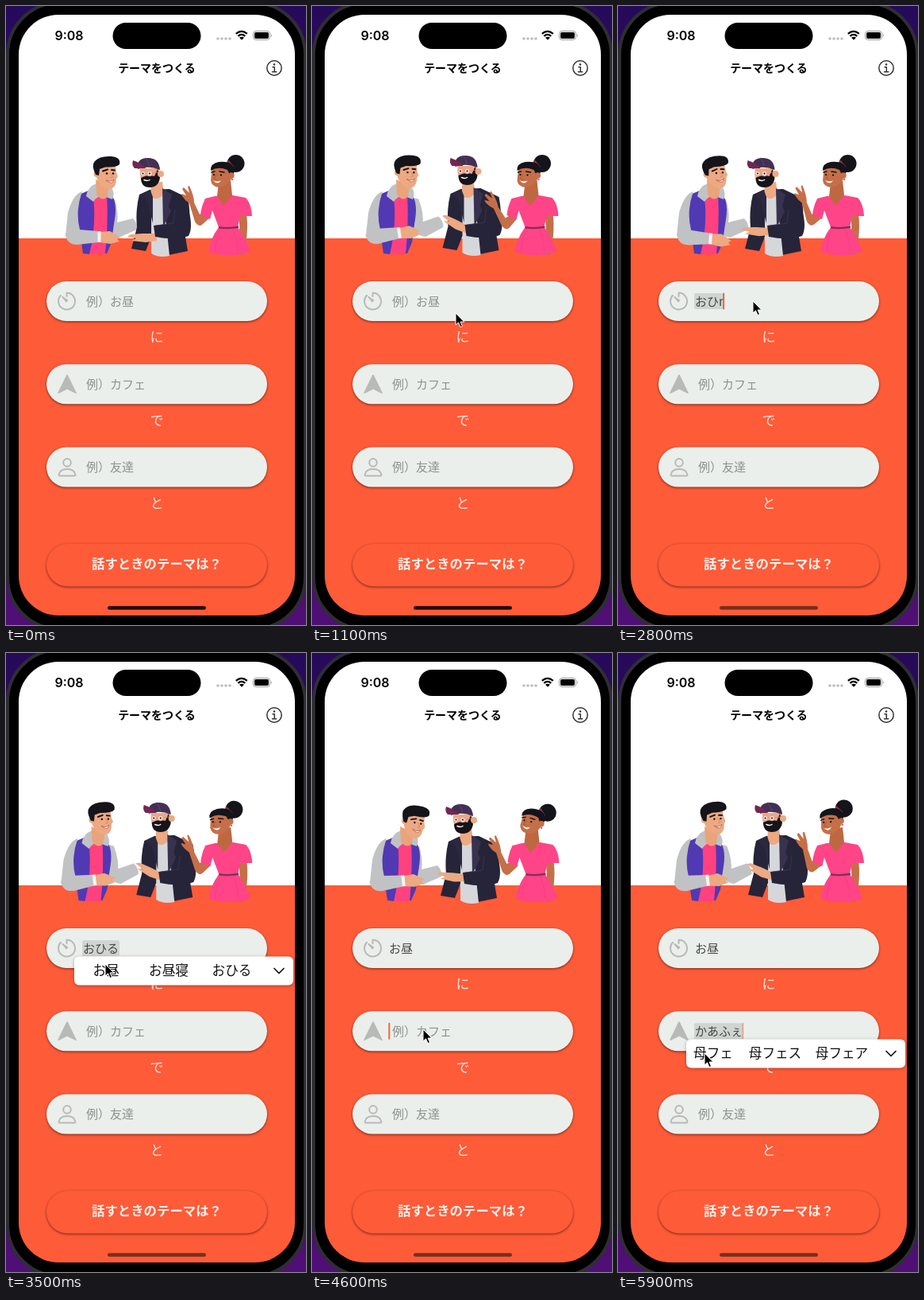
Write an HTML page that moves like this. It is 378 px wide and 778 px high and loops after 6000 ms.

```html
<!DOCTYPE html>
<html lang="ja">
<head>
<meta charset="utf-8">
<title>テーマをつくる</title>
<style>
html, body { margin: 0; width: 100%; height: 100%; overflow: hidden; background: #2b0b5c; }
svg { display: block; width: 378px; height: 778px; }
text { font-family: "Noto Sans CJK JP", "Noto Sans CJK", sans-serif; white-space: pre; }
.mid { text-anchor: middle; }
.link { font-size: 17px; font-weight: 300; fill: #ffe4dc; }
.hint { font-size: 15px; fill: #8d918f; }
.value { font-size: 15px; fill: #444746; }
.pick { font-size: 16.6px; fill: #111; }
.raised { filter: drop-shadow(0 1.3px 1.4px rgba(60, 15, 0, .7)); }
.icon { fill: none; stroke: #b7bab8; stroke-width: 2; stroke-linecap: round; stroke-linejoin: round; }
.line { fill: none; stroke-linecap: round; stroke-linejoin: round; }
</style>
</head>
<body>
<svg viewBox="0 0 378 778">
  <defs>
    <linearGradient id="desk" x2="0" y2="1">
      <stop stop-color="#260a5a"/><stop offset="1" stop-color="#500f76"/>
    </linearGradient>
    <clipPath id="screen"><rect x="16" y="11" width="348" height="755" rx="50"/></clipPath>
  </defs>
  <rect width="378" height="778" fill="url(#desk)"/>
  <rect x="2" y="-4" width="375" height="787" rx="65" fill="#000" stroke="#2f2e33" stroke-width="4"/>

  <g clip-path="url(#screen)">
    <rect width="378" height="293" fill="#fff"/>
    <rect y="292" width="378" height="486" fill="#fe5b39"/>
  </g>

  <rect x="134.500" y="21" width="111" height="33" rx="16.500"/>
  <text x="79.500" y="43" class="mid" style="font:600 16px Inter, sans-serif">9:08</text>
  <g fill="#bdbdbf">
    <circle cx="267" cy="41" r="1.800"/><circle cx="272" cy="41" r="1.800"/>
    <circle cx="277" cy="41" r="1.800"/><circle cx="282" cy="41" r="1.800"/>
  </g>
  <path d="M289.800 34.800q7-6 14 0M292.300 37.800q4.500-3.700 9 0" fill="none" stroke="#000" stroke-width="2.200"/>
  <path d="M294 39.800q3-2.200 6 0l-3 3z"/>
  <rect x="311.500" y="31.500" width="21" height="11" rx="3.500" fill="none" stroke="#999"/>
  <rect x="313" y="33" width="18" height="8" rx="2"/>
  <path d="M334 35.200q2.200 1.800 0 3.600z" fill="#999"/>
  <text x="190" y="83.300" class="mid" font-size="14" font-weight="700">テーマをつくる</text>
  <g stroke="#333" stroke-width="1.500">
    <circle cx="338" cy="78" r="9.200" class="line"/>
    <path d="M336 76.700h2.300v6M335.500 82.800h5.200" class="line"/>
  </g>
  <circle cx="338" cy="73.500" r="1.300" fill="#333"/>

  <g id="man">
    <g id="manReach">
      <path d="M128 240L137 243Q142 260 140 272L160 267Q166 273 165 281L142 291Q128 289 127 272Z" fill="#c1c2c4"/>
    </g>
    <path d="M104 232L92 237Q83 250 87 268Q93 285 95 297L97 311L105 312L127 311L133 297Q135 280 137 268Q140 249 134 239Z" fill="#5139b4"/>
    <path d="M110 240L127 238Q129 272 125 312L105 312Q114 276 110 240Z" fill="#ff427f"/>
    <path d="M96 233Q84 237 78 260L75 288Q78 299 89 299L93 281Q87 258 96 233Z" fill="#c1c2c4"/>
    <g id="manFore">
      <path d="M118 284l13-1 7 4 6 4-4 2 3 3-12 3-13-2z" fill="#eca982"/>
      <path d="M75 286Q76 300 90 300L116 297V283L92 281Z" fill="#c1c2c4"/>
      <path d="M115.500 283h4v14h-4z" fill="#f4f4f5"/>
    </g>
    <path d="M101 239Q103 227 114 223L132 227Q138 235 134 243L126 240Q117 236 110 246Z" fill="#c1c2c4"/>
    <path d="M113 218L130 226L128 239Q122 247 114 237Z" fill="#e9a47c"/>
    <g id="manHead">
      <path d="M115 201L138 201L139 209L141 214L139 217Q139 228 132 230Q119 230 114 215Z" fill="#eca982"/>
      <circle cx="114.500" cy="211" r="4" fill="#eca982"/>
      <path d="M113 212Q107 200 112 195Q118 188 133 189Q145 190 143 199Q140 203 125 202.500L118 205L117 213Z" fill="#15141b"/>
      <path d="M122 207.500l6-2M133 206l4 .5" class="line" stroke="#15141b" stroke-width="1.900"/>
      <circle cx="127" cy="210.500" r="1.200"/><circle cx="135" cy="210.500" r="1.200"/>
      <path d="M131.500 210l3 5-3 1" class="line" stroke="#cf845f" stroke-width=".8"/>
      <path d="M126 219q6 3 10-1q-2 8-10 1z" fill="#fff" stroke="#a84a3b" stroke-width=".7"/>
    </g>
  </g>

  <g id="pal">
    <path d="M181 231L168 237Q163 256 165 278L158 305L176 308L183 290L200 314L229 308L226 290Q235 270 229 241L206 230Z" fill="#262438"/>
    <path d="M183 240L198 237L206 314Q192 317 183 311Z" fill="#d6d7da"/>
    <path d="M183 222L197 221L199 236Q190 247 182 238Z" fill="#eca982"/>
    <path d="M182 232L170 237L178 245L185 273V240Z" fill="#2b2840"/>
    <path d="M197 229L209 237L205 252L208 258L198 278Z" fill="#38324f"/>
    <g id="palHand">
      <path d="M190 286L172 286L157 287L153 290L164 292L158 295L176 297L190 295Z" fill="#eca982"/>
    </g>
    <path d="M230 256Q236 278 230 289Q212 295 188 290L186 276L212 273Q217 258 219 250Z" fill="#262438"/>
    <path d="M213 256L211 273L189 276" class="line" stroke="#3d385a" stroke-width=".8"/>
    <g id="palHead">
      <path d="M169 204H193L192 219Q187 227 178 226Q170 223 169 212Z" fill="#eca982"/>
      <path d="M170 216Q179 211 187 214L191 205L194 216Q192 228 181 228Q170 228 170 216Z" fill="#15141b"/>
      <circle cx="195" cy="211" r="4" fill="#eca982"/>
      <path d="M166 205Q164 192 177 191Q193 190 194 206Q180 200 166 205Z" fill="#423055"/>
      <path d="M176 191Q180 196 181 202" class="line" stroke="#71405f" stroke-width="1"/>
      <path d="M160 194Q158 200 162 204L176 204Q172 198 160 194Z" fill="#732653"/>
      <g fill="#f8d9cb" stroke="#d98c84" stroke-width=".8">
        <circle cx="172.500" cy="210.500" r="3.200"/><circle cx="181" cy="210.500" r="3.400"/>
        <path d="M184.500 210l8-1" fill="none"/>
      </g>
      <circle cx="172.500" cy="210.500" r=".9"/><circle cx="181" cy="210.500" r=".9"/>
      <path d="M174 218.500q4 2 7 0" class="line" stroke="#fff" stroke-width="1.500"/>
    </g>
  </g>

  <g id="lady">
    <path d="M293 261L303 262Q306 281 300 313L292 313Q296 286 293 261Z" fill="#c56f49"/>
    <g id="ladyArm">
      <path d="M255 257L244 262L237 247Q237 239 231 226L229 227L231 235L224 228L222 230L227 238L221 236L222 239L226 244L231 248L238 271Q243 279 248 274L258 265Z" fill="#c56f49"/>
    </g>
    <path d="M263 239L251 242Q246 252 245 263L257 268L260 257L268 278Q257 293 255 309Q270 314 286 313Q299 313 308 308Q301 290 292 278L295 264L310 264Q309 248 302 241L286 238Z" fill="#ff4487"/>
    <path d="M268 277Q280 279 293 276.500V279Q281 281 268 279.500Z" fill="#803058"/>
    <path d="M270 281Q264 293 263 308M286 281Q292 294 292 307" class="line" stroke="#f23d7f" stroke-width=".8"/>
    <path d="M268 222L283 219L285 238L274 251L266 239Z" fill="#bd6841"/>
    <g id="ladyHead">
      <circle cx="289.500" cy="198" r="11" fill="#15141b"/>
      <path d="M280 195l6 7" class="line" stroke="#913049" stroke-width="2.500"/>
      <path d="M260 202L284 201L284 217Q279 227 268 228Q259 227 258 219Z" fill="#c56f49"/>
      <path d="M258 207Q257 198 268 196Q285 194 288 205Q288 212 283 214L279 206Q267 201 258 207Z" fill="#15141b"/>
      <circle cx="284" cy="213" r="3.700" fill="#c56f49"/>
      <circle cx="285" cy="218" r="1.200" fill="#ff4487"/>
      <path d="M259 209l4-1M269 208l6 1" class="line" stroke="#15141b" stroke-width="1.500"/>
      <circle cx="262" cy="212" r="1.100"/><circle cx="271" cy="212.500" r="1.100"/>
      <path d="M265 212l-3 5 3 1" class="line" stroke="#a2552f" stroke-width=".8"/>
      <path d="M261 219q6 3 10 0q-4 7-10 0z" fill="#fff"/>
    </g>
  </g>

  <g id="fields"></g>
  <rect x="51" y="676" width="278" height="53.500" rx="26.700" fill="#fe5b39" class="raised"/>
  <text x="190" y="707" class="mid" font-size="16.400" font-weight="700" fill="#fff0eb">話すときのテーマは？</text>
  <rect id="home" x="128" y="754.300" width="124" height="4.500" rx="2.200"/>

  <g id="popup">
    <rect x="86" y="381.500" width="276" height="36" rx="6" fill="#fff" style="filter:drop-shadow(0 1px 2px rgba(0,0,0,.3))"/>
    <text class="pick mid" y="405.300"></text>
    <text class="pick mid" y="405.300"></text>
    <text class="pick mid" y="405.300"></text>
    <path d="M338 396.500l6 6 6-6" class="line" stroke="#111" stroke-width="1.700"/>
  </g>
  <path id="mouse" d="M0 0V15L3.500 11.800L6 17.500L8.500 16.400L6 11H10.800Z" stroke="#fff" stroke-width="1"/>
</svg>

<script>
const LOOP = 6000, STEP = 100, SWAY = 2500;
const $ = id => document.getElementById(id);

const icons = [
  '<path class="icon" d="M76.500 365v-4.500a10.500 10.500 0 1 1-7.500 3.200M76.500 371l-5-5"/><path d="M70 364.500l8.500 5-3 3z" fill="#b7bab8"/>',
  '<path d="M77 359.500L88 382L77 376.500L66 382Z" fill="#b7bab8" stroke="#b7bab8" stroke-width="1.500" stroke-linejoin="round"/>',
  '<g class="icon"><circle cx="77" cy="365.300" r="4.800"/><path d="M66.500 380.500Q68 373.500 77 373.500T87.500 380.500Q87.500 382 86 382H68Q66.500 382 66.500 380.500Z"/></g>'
];
const hints = ['お昼', 'カフェ', '友達'], links = ['に', 'で', 'と'];

$('fields').innerHTML = icons.map((icon, i) => `
  <g transform="translate(0 ${i * 104.3})">
    <rect x="51" y="346" width="278" height="50" rx="25" fill="#ebefeb" class="raised"/>${icon}
    <rect class="mark" x="96" y="361" height="20" rx="2" fill="#d0d5d1"/>
    <text class="hint" x="101" y="376.500">例）${hints[i]}</text>
    <text class="value" x="97" y="376.500"></text>
    <rect class="caret" y="360.500" width="2" height="21" rx="1" fill="#f0643f"/>
    <text class="link mid" x="190" y="422.300">${links[i]}</text>
  </g>`).join('');

const fields = [...$('fields').children].map(g => {
  const part = name => g.querySelector('.' + name);
  return { mark: part('mark'), hint: part('hint'), value: part('value'), caret: part('caret') };
});

// Per field: focus span, commit time and the text from each moment on
const inputs = [
  { from: 1600, to: 4400, commit: 3700, text: [[2200, 'お'], [2500, 'おh'], [2600, 'おひ'], [2800, 'おひr'], [2900, 'おひる'], [3700, 'お昼']] },
  { from: 4500, to: LOOP, commit: LOOP, text: [[4800, 'k'], [4900, 'か'], [5100, 'かあ'], [5300, 'かあf'], [5400, 'かあふ'], [5500, 'かあふぇ']] },
  { from: LOOP, to: LOOP, commit: LOOP, text: [] }
];
const popups = [
  { from: 3100, to: 3700, y: 0, picks: [['お昼', 126], ['お昼寝', 205], ['おひる', 284.5]] },
  { from: 5600, to: LOOP, y: 104, picks: [['母フェ', 120], ['母フェス', 198], ['母フェア', 282]] }
];
const mouseX = [[900, 205], [1100, 181], [1300, 170], [3000, 170], [3300, 125], [3900, 125], [4300, 140], [5500, 140], [5800, 109]];
const mouseY = [[900, 430], [1100, 386], [1300, 371], [3000, 371], [3300, 391], [3900, 391], [4300, 473], [5500, 473], [5800, 503]];

// Eased value of [time, value] keys
function ease(keys, t) {
  const i = keys.findIndex(k => k[0] > t);
  if (i < 0) return keys[keys.length - 1][1];
  if (!i) return keys[0][1];
  const [a, x] = keys[i - 1], [b, y] = keys[i];
  return x + (y - x) * (1 - Math.cos(Math.PI * (t - a) / (b - a))) / 2;
}

const beats = [0, .12, .36, .44, .76, .84, 1];
const pose = (id, x, y = 0, turn = 0, cx = 0, cy = 0) =>
  $(id).setAttribute('transform', `translate(${x} ${y}) rotate(${turn} ${cx} ${cy})`);

function drawPeople(t) {
  const p = t % SWAY / SWAY;
  const at = (...v) => ease(beats.map((b, i) => [b, v[i % v.length]]), p);
  const lean = at(0, 0, 1, 1, 1, 0, 0);

  pose('man', at(0, -1, -4, -7, -7, -2, 0));
  pose('manHead', 0, at(0, 0, -1.5, -1.5, 0, 1, 0), at(0, -5, -4, 1, 10, 11, 0), 121, 234);
  pose('manFore', 0, 0, at(0, 4, -7, -8, -8, -6, 0), 82, 292);
  pose('manReach', 7 * lean, 0, -5 * lean, 130, 275);

  pose('pal', at(0, 2, 6, 6.5, 6, 4, 0), -lean);
  pose('palHead', at(0, 1.5, 7, 8, 7, 5, 0), at(0, 0, -2, -2, -2, -1, 0));
  pose('palHand', 0, at(0, -7, -8, -8, -8, -8, 0), at(0, 3, 25, 28, 28, 6, 0), 190, 290);

  pose('lady', at(0, 0, 0, .5, 1.5, 1.5, 0));
  pose('ladyHead', 0, at(0, 0, -1, 0, 0, 0, 0), at(0, 0, -7, 0, 8, 9, 0), 275, 236);
  pose('ladyArm', 0, at(0, 0, 0, 4, 4, 3, 0), at(0, 2, 5, -8, -3, -1, 0), 248, 268);
}

function drawField(f, { from, to, commit, text }, t) {
  const [last, value] = text.filter(k => k[0] <= t).pop() || [from, ''];
  f.value.textContent = value;
  f.hint.style.opacity = value ? 0 : 1;
  const width = value ? f.value.getComputedTextLength() : 0;
  f.mark.setAttribute('width', value && t < commit ? width + 2 : 0);
  const blink = (t - last) % 1000;
  f.caret.setAttribute('x', 96.3 + width);
  f.caret.style.opacity = t < from || t >= to ? 0 : blink < 400 ? 1 : blink >= 500 && blink < 900 ? 0 : .4;
}

function drawPopup(t) {
  const open = popups.find(p => t >= p.from && t < p.to);
  $('popup').style.display = open ? '' : 'none';
  if (!open) return;
  pose('popup', 0, open.y);
  $('popup').querySelectorAll('text').forEach((el, i) => {
    [el.textContent] = open.picks[i];
    el.setAttribute('x', open.picks[i][1]);
  });
}

function draw(now) {
  const t = Math.floor(now % LOOP / STEP) * STEP;
  drawPeople(t);
  fields.forEach((f, i) => drawField(f, inputs[i], t));
  drawPopup(t);
  $('home').setAttribute('fill', t < 1500 ? '#1d0d09' : '#74301f');
  $('mouse').style.display = t < 900 ? 'none' : '';
  pose('mouse', ease(mouseX, t), ease(mouseY, t));
}

const start = performance.now();
function tick() {
  draw(performance.now() - start);
  requestAnimationFrame(tick);
}
tick();
</script>
</body>
</html>
```
